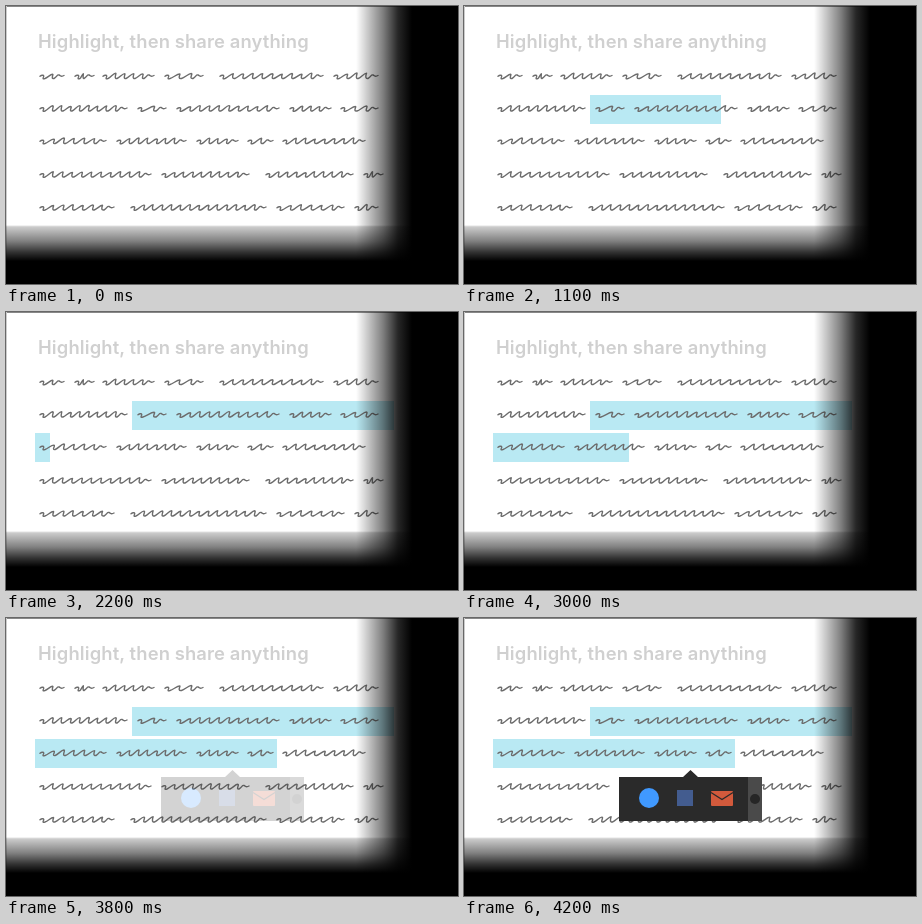
These frames come from a looping animation (452 px wide and 278 px high, 8000 ms). An HTML page:

```html
<!DOCTYPE html>
<html lang="en">
<head>
<meta charset="utf-8">
<style>
html, body { margin: 0; width: 100%; height: 100%; overflow: hidden; background: #000; }
svg { display: block; width: 452px; height: 278px; }
</style>
</head>
<body>
<svg viewBox="0 0 452 278" xmlns="http://www.w3.org/2000/svg">
  <defs>
    <linearGradient id="right" gradientUnits="userSpaceOnUse" x1="350" x2="406" y1="0" y2="0">
      <stop offset="0" stop-opacity="0"/>
      <stop offset=".12" stop-opacity=".12"/>
      <stop offset=".48" stop-opacity=".5"/>
      <stop offset=".75" stop-opacity=".85"/>
      <stop offset="1" stop-opacity="1"/>
    </linearGradient>
    <linearGradient id="bottom" gradientUnits="userSpaceOnUse" x1="0" x2="0" y1="219" y2="255">
      <stop offset="0" stop-opacity="0"/>
      <stop offset=".05" stop-opacity=".2"/>
      <stop offset=".45" stop-opacity=".5"/>
      <stop offset=".75" stop-opacity=".8"/>
      <stop offset="1" stop-opacity="1"/>
    </linearGradient>
  </defs>
  <rect width="452" height="278" fill="#fff"/>
  <rect width="452" height="1" fill="#888"/>
  <rect width="1" height="278" fill="#ccc"/>
  <text x="32" y="42" font-family="Inter, sans-serif" font-size="18.4" font-weight="600" letter-spacing=".12" fill="#d0d0d0">Highlight, then share anything</text>
  <g fill="#b9e9f3">
    <rect id="mark1" x="126" y="89" width="0" height="29"/>
    <rect id="mark2" x="29" y="121" width="0" height="29"/>
  </g>
  <path id="scrawl" fill="none" stroke="#6c6c6c" stroke-width="1.4" stroke-linecap="round" stroke-linejoin="round"/>
  <rect width="452" height="278" fill="url(#right)"/>
  <rect width="452" height="278" fill="url(#bottom)"/>
  <g id="popup" opacity="0">
    <path d="M155 159H219L226.500 152L234 159H298V203H155Z" fill="#2a2a2a"/>
    <rect x="284" y="159" width="14" height="44" fill="#4a4a4a"/>
    <circle cx="185" cy="180" r="10" fill="#4099ff"/>
    <rect x="213" y="172" width="16" height="16" fill="#435c8f"/>
    <rect x="247" y="173" width="22" height="15" rx="1" fill="#d25a3c"/>
    <path d="M247 174.500L258 181.500L269 174.500" fill="none" stroke="#2a2a2a" stroke-width="1.300"/>
    <circle cx="291" cy="181" r="5" fill="#262626"/>
  </g>
</svg>
<script>
const $ = id => document.getElementById(id);
const LOOP = 8000, STEP = 100;
const clamp = (v, lo, hi) => Math.min(hi, Math.max(lo, v));

// Each line: y, then the start and end of every word
const lines = [
  [70, 34, 58, 69, 86, 97, 148, 159, 197, 214, 317, 328, 372],
  [102.5, 34, 121, 132, 160, 171, 273, 284, 325, 335, 372],
  [135, 34, 100, 111, 180, 191, 232, 242, 267, 277, 359],
  [168.5, 34, 145, 156, 243, 260, 347, 358, 372],
  [201.5, 34, 108, 125, 260, 271, 338, 349, 372]
];

let seed = 11;
const rand = () => (seed = (seed * 16807) % 2147483647) / 2147483647;

// Short flat lead-in, slanted waves, then a long low tail
function word(x0, x1, y) {
  const lead = 5, tail = 10, room = Math.max(4, x1 - x0 - lead - tail);
  const n = Math.max(1, Math.round(room / 9.5)), p = room / n;
  const at = (x, dy) => `${(x0 + x).toFixed(1)} ${(y + dy).toFixed(1)}`;
  let d = `M${at(0, .3)}C${at(2, -1.5)} ${at(4.5, -1)} ${at(3.5, 1)}S${at(3, 3)} ${at(lead, 2.5)}`;
  for (let i = 0; i < n; i++) {
    const x = lead + i * p, top = -1.8 - rand() * 1.2, round = rand() * 2.5;
    d += `C${at(x + p * .3, 1.5)} ${at(x + p * .6, top)} ${at(x + p * .85, top)}`;
    d += `C${at(x + p * .85 + round, top)} ${at(x + p * .6, 3.2)} ${at(x + p, 2.5)}`;
  }
  const end = lead + room;
  return d + `C${at(end + 3, 1)} ${at(end + 3, -1.8)} ${at(end + 5, -1)}S${at(end + 7, 1.2)} ${at(end + tail, -.5)}`;
}

let ink = '';
for (const [y, ...xs] of lines)
  for (let i = 0; i < xs.length; i += 2) ink += word(xs[i], xs[i + 1], y);
$('scrawl').setAttribute('d', ink);

function sweep(id, t, start, first, rate, max) {
  const w = t < start ? 0 : Math.min(max, first + rate * (t - start) / STEP);
  $(id).setAttribute('width', w);
}

function draw(now) {
  const t = Math.floor((now % LOOP) / STEP) * STEP;
  sweep('mark1', t, 500, 8, 20.5, 262);
  sweep('mark2', t, 2200, 15, 15.13, 242);
  $('popup').setAttribute('opacity', clamp((t - 3700) / 500, 0, 1));
}

const begin = performance.now();
function tick() {
  draw(performance.now() - begin);
  requestAnimationFrame(tick);
}
tick();
</script>
</body>
</html>
```
